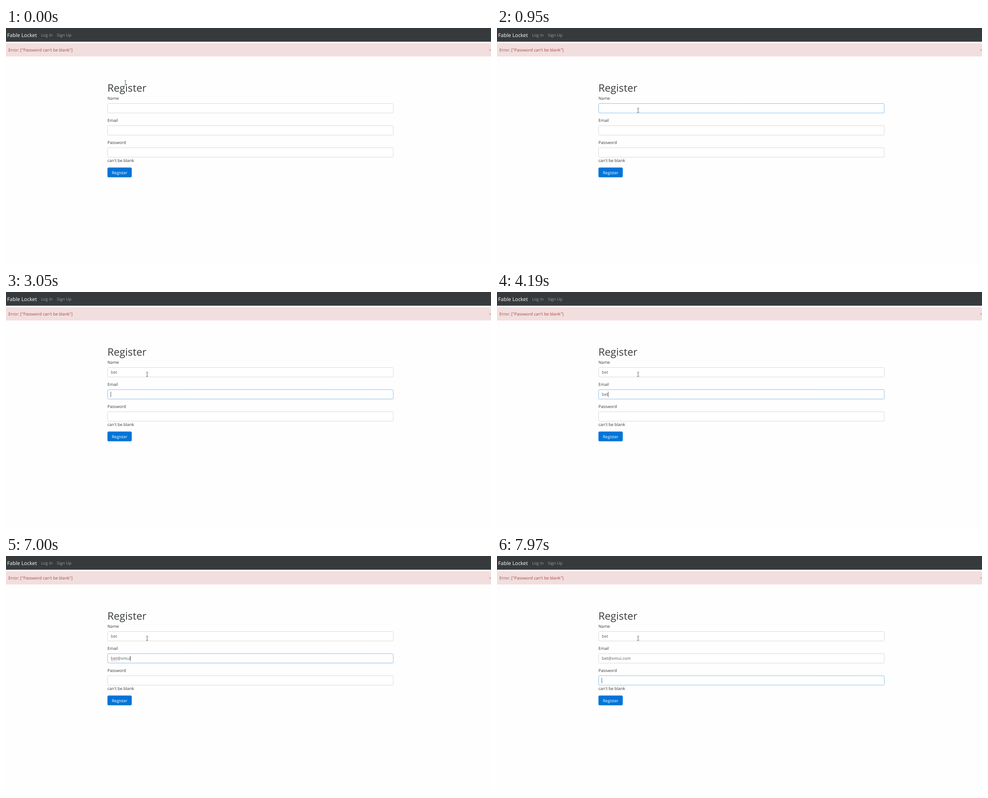
Recreate the animation shown at these times as an HTML page with a canvas. Size 1071 by 523 pixels, loop 8 s.

```html
<!DOCTYPE html>
<html lang="en">
<head>
<meta charset="utf-8">
<title>Register</title>
<style>
  html, body { margin: 0; width: 100%; height: 100%; overflow: hidden; background: #fefefe; }
  canvas { display: block; }
</style>
</head>
<body>
<canvas id="stage" width="1071" height="523"></canvas>
<script>
const ctx = document.getElementById('stage').getContext('2d');
const LOOP = 8000;
const REM = 9.104;            // body text size; all sizes follow from it
const PX = REM / 16;
const LEFT = 224;
const WIDTH = 1110 * PX;
const FIELD_H = 38 * PX;
const TEXT_X = LEFT + 13 * PX;
const fieldTop = i => 167.1 + i * 86 * PX;

const USER = 'bet';
const MAIL = 'bet@xmui.com';
const LABELS = ['Name', 'Email', 'Password'];

// time, pointer centre x, y
const POINTER = [
  [0, 263.6, 121.4], [150, 266.5, 148], [280, 270, 176.5], [400, 272.4, 170.5],
  [550, 272.4, 178], [700, 282, 180], [830, 301, 182], [950, 311.6, 182.4]
];

// time, focused field, letters typed in it, caret shown
const TYPING = [
  [0, -1, 0, 0],
  [550, 0, 0, 1], [950, 0, 0, 0], [1540, 0, 0, 1], [2090, 0, 0, 0],
  [2220, 0, 1, 1], [2360, 0, 2, 1], [2490, 0, 3, 1],
  [3050, 1, 0, 1], [3600, 1, 0, 0], [3880, 1, 1, 1], [4190, 1, 3, 1],
  [4730, 1, 3, 0], [5270, 1, 3, 1], [5420, 1, 4, 1], [5700, 1, 5, 1],
  [5850, 1, 6, 1], [5980, 1, 8, 1], [6490, 1, 8, 0], [7000, 1, 8, 1],
  [7130, 1, 9, 1], [7560, 1, 10, 1], [7690, 1, 11, 1], [7820, 1, 12, 1],
  [7970, 2, 0, 1]
];

const current = (rows, t) => rows.findLast(row => row[0] <= t);

function setFont(size, weight = 400) {
  ctx.font = `${weight} ${size}px "Open Sans", "Noto Sans", sans-serif`;
  ctx.textRendering = 'geometricPrecision';
}

// Text centred vertically on a line box
function text(str, x, middle, color, size = REM, weight = 400) {
  setFont(size, weight);
  ctx.fillStyle = color;
  ctx.fillText(str, x, middle + 0.388 * size);
}

function textWidth(str) {
  setFont(REM);
  return ctx.measureText(str).width;
}

function rect(x, y, w, h, color) {
  ctx.fillStyle = color;
  ctx.fillRect(x, y, w, h);
}

function roundBox(x, y, w, h, fill, stroke, line) {
  ctx.beginPath();
  ctx.roundRect(x + line / 2, y + line / 2, w - line, h - line, 4 * PX);
  ctx.fillStyle = fill;
  ctx.fill();
  ctx.strokeStyle = stroke;
  ctx.lineWidth = line;
  ctx.stroke();
}

function drawHeader() {
  rect(0, 0, 1071, 30.4, '#373a3c');
  text('Fable Locket', 2.5, 15.4, '#fff', REM * 1.25);
  text('Log In', 77.4, 15.3, '#9b9c9d');
  text('Sign Up', 112.2, 15.3, '#9b9c9d');

  rect(0, 34.2, 1071, 28.5, '#ebcccc');
  rect(0, 34.8, 1071, 27.3, '#f2dede');
  text('Error: ["Password can\'t be blank"]', 5.3, 48.4, '#a94442');
  text('×', 1065.8, 49.6, '#fff', REM * 1.5, 700);
  text('×', 1065.8, 49, '#c2b2b2', REM * 1.5, 700);
}

function squiggle(from, to, y) {
  ctx.beginPath();
  ctx.moveTo(from, y);
  for (let x = from, up = true; x < to; x += 2 * PX, up = !up) {
    ctx.lineTo(x, y + (up ? -0.45 : 0.45));
  }
  ctx.strokeStyle = 'rgba(255,0,0,.65)';
  ctx.lineWidth = 0.6;
  ctx.stroke();
}

function drawForm(t) {
  const [, focus, count, caret] = current(TYPING, t);
  const full = [USER, MAIL, ''];

  text('Register', LEFT, 131.8, '#373a3c', REM * 2.5);
  LABELS.forEach((label, i) => {
    const top = fieldTop(i);
    const middle = top + FIELD_H / 2;
    const active = i === focus;
    const value = active ? full[i].slice(0, count) : i < focus ? full[i] : '';

    text(label, LEFT, top - 20 * PX, '#373a3c');
    roundBox(LEFT, top, WIDTH, FIELD_H, '#fff', active ? '#66afe9' : '#cfcfcf', 0.8);
    text(value, TEXT_X, middle, '#55595c');
    if (active && caret) {
      const x = Math.floor(TEXT_X + textWidth(value));
      rect(x, Math.round(middle) - 6, 1, 12, 'rgba(50,45,45,.8)');
    }
  });

  if (focus === 1) {
    const y = fieldTop(1) + 16.2;
    const domain = TEXT_X + textWidth(MAIL.slice(0, 4));
    if (t >= 5550) squiggle(TEXT_X, TEXT_X + textWidth(USER), y);
    if (t >= 7260) squiggle(domain, TEXT_X + textWidth(MAIL.slice(0, 8)), y);
  }

  text("can't be blank", LEFT, 293.4, '#373a3c');
  roundBox(LEFT, 309.3, 53.7, FIELD_H, '#0275d8', '#0275d8', 0.6);
  text('Register', LEFT + 17 * PX, 320.1, '#fff');
}

function drawPointer(t) {
  const [, x, y] = current(POINTER, t);
  ctx.beginPath();
  ctx.moveTo(x, y - 4.4);
  ctx.lineTo(x, y + 4.4);
  for (const end of [-4.8, 4.8]) {
    ctx.moveTo(x - 2.2, y + end);
    ctx.lineTo(x - 0.4, y + end);
    ctx.moveTo(x + 0.4, y + end);
    ctx.lineTo(x + 2.2, y + end);
  }
  ctx.strokeStyle = '#333';
  ctx.lineWidth = 0.8;
  ctx.stroke();
}

function frame(now) {
  const t = now % LOOP;
  rect(0, 0, 1071, 523, '#fefefe');
  drawHeader();
  drawForm(t);
  drawPointer(t);
  requestAnimationFrame(frame);
}
requestAnimationFrame(frame);
</script>
</body>
</html>
```
